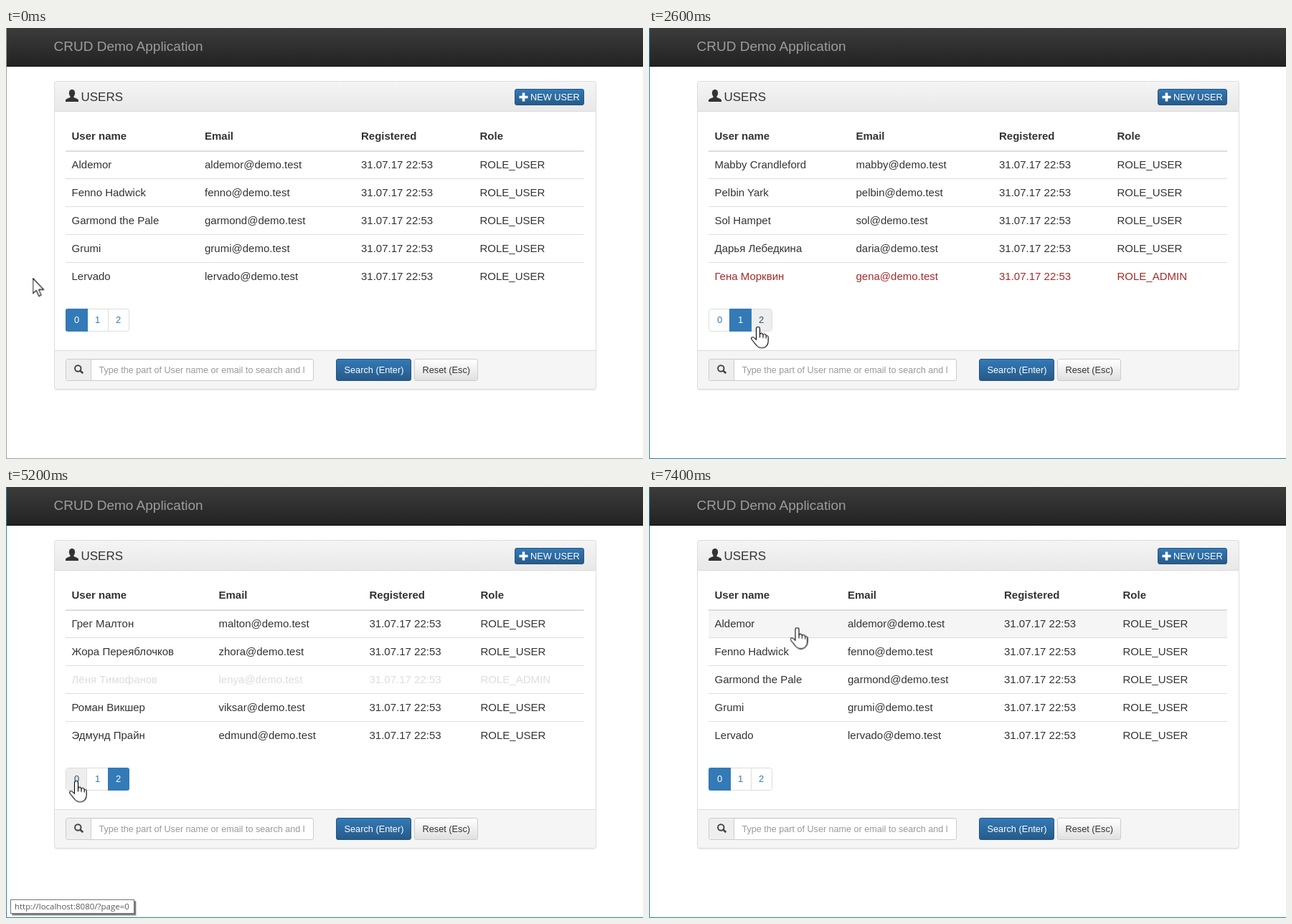
Write an HTML page that moves like this. It is 888 px wide and 602 px high and loops after 8 s.

```html
<!DOCTYPE html>
<html lang="en">
<head>
<meta charset="utf-8">
<title>CRUD Demo Application</title>
<style>
html, body { margin: 0; width: 100%; height: 100%; overflow: hidden; background: #fff; }
svg { display: block; width: 888px; height: 602px; }
text { font-family: "Liberation Sans", Arial, sans-serif; font-size: 15px; fill: #333; white-space: pre; }
.head { font-weight: bold; }
.small { font-size: 12.75px; }
.mid { text-anchor: middle; font-size: 13px; fill: #337ab7; }
.white { fill: #fff; }
.admin { fill: #a52a2a; }
.off { fill: #ddd; }
.rule { stroke: #ddd; }
.tip text { font: 11.5px "Open Sans", "Noto Sans", sans-serif; fill: #575757; }

/* every change is a hard cut; 2.5% = 200 ms */
.anim { animation: 8s step-end infinite; }
#frame { animation-name: frame; }
#page0 { animation-name: page0; }
#page1 { animation-name: page1; }
#page2 { animation-name: page2; }
#hover0 { animation-name: hover0; }
#hover1 { animation-name: hover1; }
#hover2 { animation-name: hover2; }
#tip0 { animation-name: tip0; }
#tip1 { animation-name: tip1; }
#tip2 { animation-name: tip2; }
#rowHover { animation-name: rowHover; }
#cursor { animation-name: move; }
#arrow { animation-name: arrow; }
#hand { animation-name: hand; }

@keyframes frame { 0% { stroke: #a0a0a0 } 17.5%, 100% { stroke: #2b82a3 } }
@keyframes page0 { 0% { opacity: 1 } 20% { opacity: 0 } 72.5%, 100% { opacity: 1 } }
@keyframes page1 { 0% { opacity: 0 } 20% { opacity: 1 } 47.5%, 100% { opacity: 0 } }
@keyframes page2 { 0% { opacity: 0 } 47.5% { opacity: 1 } 72.5%, 100% { opacity: 0 } }
@keyframes hover0 { 0% { opacity: 0 } 62.5% { opacity: 1 } 72.5%, 100% { opacity: 0 } }
@keyframes hover1 { 0% { opacity: 0 } 7.5% { opacity: 1 } 20% { opacity: 0 } 57.5% { opacity: 1 } 62.5%, 100% { opacity: 0 } }
@keyframes hover2 { 0% { opacity: 0 } 32.5% { opacity: 1 } 47.5%, 100% { opacity: 0 } }
@keyframes tip0 { 0% { opacity: 0 } 65% { opacity: 1 } 72.5% { opacity: .4 } 75%, 100% { opacity: 0 } }
@keyframes tip1 { 0% { opacity: 0 } 10% { opacity: 1 } 20% { opacity: .5 } 22.5% { opacity: .06 } 27.5%, 100% { opacity: 0 } }
@keyframes tip2 { 0% { opacity: 0 } 35% { opacity: 1 } 57.5% { opacity: .5 } 60%, 100% { opacity: 0 } }
@keyframes rowHover {
  0% { opacity: 0; transform: none }
  87.5% { opacity: 1; transform: translateY(156px) }
  90% { opacity: 1; transform: translateY(78px) }
  92.5%, 100% { opacity: 1; transform: none }
}
@keyframes arrow {
  0% { opacity: 1 } 7.5% { opacity: 0 } 20% { opacity: 1 } 32.5% { opacity: 0 } 47.5% { opacity: 1 }
  57.5% { opacity: 0 } 72.5% { opacity: 1 } 87.5%, 100% { opacity: 0 }
}
@keyframes hand {
  0% { opacity: 0 } 7.5% { opacity: 1 } 20% { opacity: 0 } 32.5% { opacity: 1 } 47.5% { opacity: 0 }
  57.5% { opacity: 1 } 72.5% { opacity: 0 } 87.5%, 100% { opacity: 1 }
}
@keyframes move {
  0% { transform: translate(37.5px, 349.5px) }
  2.5% { transform: translate(58px, 367px) }
  5% { transform: translate(98px, 398px) }
  7.5% { transform: translate(125px, 414px) }
  10% { transform: translate(133.5px, 417.5px) }
  20% { transform: translate(131.5px, 417.5px) }
  27.5% { transform: translate(134px, 417.5px) }
  30% { transform: translate(140px, 417.5px) }
  32.5% { transform: translate(152px, 417.5px) }
  35% { transform: translate(158.5px, 417.5px) }
  47.5% { transform: translate(155px, 417.5px) }
  55% { transform: translate(152.5px, 417.5px) }
  57.5% { transform: translate(138px, 416px) }
  60% { transform: translate(118px, 413px) }
  62.5% { transform: translate(100px, 410.5px) }
  65% { transform: translate(98px, 410.5px) }
  72.5% { transform: translate(95.5px, 410.5px) }
  75% { transform: translate(97px, 412px) }
  77.5% { transform: translate(122px, 428px) }
  80% { transform: translate(165px, 434px) }
  82.5% { transform: translate(215px, 430px) }
  85% { transform: translate(253px, 414px) }
  87.5% { transform: translate(244px, 358px) }
  90% { transform: translate(224px, 262px) }
  92.5%, 100% { transform: translate(206.5px, 196.5px) }
}
</style>
</head>
<body>
<svg viewBox="0 0 888 602">
  <defs>
    <linearGradient id="nav" x2="0" y2="1"><stop stop-color="#3c3c3c"/><stop offset="1" stop-color="#222"/></linearGradient>
    <linearGradient id="title" x2="0" y2="1"><stop stop-color="#f5f5f5"/><stop offset="1" stop-color="#e8e8e8"/></linearGradient>
    <linearGradient id="blue" x2="0" y2="1"><stop stop-color="#337ab7"/><stop offset="1" stop-color="#265a88"/></linearGradient>
    <linearGradient id="grey" x2="0" y2="1"><stop stop-color="#fff"/><stop offset="1" stop-color="#e0e0e0"/></linearGradient>
    <clipPath id="panel"><rect x="67" y="74" width="756" height="431" rx="4"/></clipPath>
    <clipPath id="pager"><rect x="83" y="392" width="89" height="32" rx="3"/></clipPath>
  </defs>

  <rect width="888" height="53" fill="url(#nav)"/>
  <rect y="53" width="888" height="1" fill="#080808"/>
  <text x="66.5" y="32" style="font-size:19px;fill:#9d9d9d">CRUD Demo Application</text>
  <path id="frame" class="anim" d="M.5 0V601.5H888" fill="none"/>

  <rect x="67" y="75" width="756" height="431.5" rx="4" fill="#000" opacity=".07"/>
  <g clip-path="url(#panel)">
    <rect x="67" y="74" width="756" height="431" fill="#fff"/>
    <rect x="67" y="74" width="756" height="42" fill="url(#title)"/>
    <rect x="67" y="450" width="756" height="55" fill="#f5f5f5"/>
    <path class="rule" d="M67 116.5H823M67 450.5H823"/>
  </g>
  <rect class="rule" x="67.5" y="74.5" width="755" height="430" rx="3.5" fill="none"/>

  <g fill="#333">
    <ellipse cx="92" cy="91" rx="4.2" ry="5.2"/>
    <path d="M89.5 94H94.5V97Q101 99 101 101V103H83V101Q83 99 89.5 97Z"/>
  </g>
  <text x="104.5" y="102" style="font-size:17px">USERS</text>

  <rect x="709.5" y="85.5" width="96" height="22" rx="2.5" fill="url(#blue)" stroke="#245580"/>
  <path d="M715.5 96.5H727.5M721.5 90.5V102.5" stroke="#fff" stroke-width="3.6"/>
  <text class="small white" x="731" y="101">NEW USER</text>

  <rect id="rowHover" class="anim" x="83" y="173" width="723" height="37" fill="#f5f5f5"/>
  <path d="M83 172H806" stroke="#ddd" stroke-width="2"/>
  <path class="rule" d="M83 210.5H806M83 249.5H806M83 288.5H806M83 327.5H806"/>
  <g id="pages"></g>

  <rect x="83.5" y="462.5" width="345" height="30" rx="2.5" fill="#fff" stroke="#ccc"/>
  <path d="M118.5 463V492H86Q84 492 84 490V465Q84 463 86 463Z" fill="#eee"/>
  <path d="M118.5 463V492" stroke="#ccc"/>
  <path d="M119 463.5H427" stroke="#000" opacity=".06"/>
  <g fill="none" stroke="#444" stroke-width="2">
    <circle cx="100.3" cy="475.5" r="4.2"/>
    <path d="M103.5 478.7L107.3 482.3" stroke-width="2.6"/>
  </g>
  <text x="129.5" y="482" style="font-size:12.6px;fill:#999">Type the part of User name or email to search and l</text>
  <rect x="460.5" y="462.5" width="104" height="30" rx="2.5" fill="url(#blue)" stroke="#245580"/>
  <text class="small white" x="471.5" y="482">Search (Enter)</text>
  <rect x="569.5" y="462.5" width="88" height="30" rx="2.5" fill="url(#grey)" stroke="#ccc"/>
  <text class="small" x="580.5" y="482">Reset (Esc)</text>

  <g id="hovers"></g>
  <g id="tips"></g>

  <g id="cursor" class="anim" fill="#fff" stroke="#000" stroke-width="1.1" stroke-linejoin="round">
    <path id="arrow" class="anim" d="M0 0V21.3L4.8 17L8.4 25L11.6 23.6L8.2 15.9H15Z"/>
    <g id="hand" class="anim">
      <path d="M-2.5 18V2.5a2.5 2.5 0 0 1 5 0V10.5a2.3 2.3 0 0 1 4.5 .8a2.2 2.2 0 0 1 4.2 .9a2.1 2.1 0 0 1 3 2V20q0 4-2 6q-2 3.3-7 3.3q-5 0-7.7-4L-8.9 17.5q-1.3-3 1.3-3.3q2-.1 5.1 3.8z"/>
      <path d="M2.5 10.5V15M7 11.3V15.5M11.2 12.2V16" fill="none"/>
    </g>
  </g>
</svg>
<script>
const DATE = "31.07.17 22:53";
const HEAD = ["User name", "Email", "Registered", "Role"];
// rows: name, mailbox, optional style for administrators
const PAGES = [
  { cols: [91.5, 277, 495, 660.5], rows: [
    ["Aldemor", "aldemor"], ["Fenno Hadwick", "fenno"], ["Garmond the Pale", "garmond"],
    ["Grumi", "grumi"], ["Lervado", "lervado"]] },
  { cols: [91.5, 288.5, 488, 652.5], rows: [
    ["Mabby Crandleford", "mabby"], ["Pelbin Yark", "pelbin"], ["Sol Hampet", "sol"],
    ["Дарья Лебедкина", "daria"], ["Гена Морквин", "gena", "admin"]] },
  { cols: [91.5, 296.5, 506.5, 661.5], rows: [
    ["Грег Малтон", "malton"], ["Жора Переяблочков", "zhora"], ["Лёня Тимофанов", "lenya", "off"],
    ["Роман Викшер", "viksar"], ["Эдмунд Прайн", "edmund"]] }
];
const DIGIT_X = [98.5, 127.5, 156.5];
const BOX = [[83, 31], [112, 31], [142, 30]];

const text = (x, y, s, cls = "") => `<text x="${x}" y="${y}" class="${cls}">${s}</text>`;
const line = (cols, y, cells, cls) => cells.map((s, i) => text(cols[i], y, s, cls)).join("");
const digit = (k, cls = "", style = "") =>
  `<text x="${DIGIT_X[k]}" y="412" class="mid ${cls}" style="${style}">${k}</text>`;

function pager(active) {
  const [x, w] = BOX[active];
  return `<rect class="rule" x="83.5" y="392.5" width="88" height="31" rx="3" fill="#fff"/>
    <path class="rule" d="M112.5 393V423M142.5 393V423"/>
    <rect x="${x}" y="392" width="${w}" height="32" fill="#337ab7" clip-path="url(#pager)"/>` +
    BOX.map((_, k) => digit(k, k === active ? "white" : "")).join("");
}

function page({ cols, rows }, k) {
  const body = rows.map(([name, box, cls], i) =>
    line(cols, 196 + 39 * i,
      [name, box + "@demo.test", DATE, cls ? "ROLE_ADMIN" : "ROLE_USER"], cls));
  return `<g id="page${k}" class="anim">${line(cols, 156, HEAD, "head")}${body.join("")}${pager(k)}</g>`;
}

const hover = (_, k) => `<g id="hover${k}" class="anim">
  <rect x="${[84, 114, 143][k]}" y="393" width="28" height="30" rx="1" fill="#eee"/>
  ${digit(k, "", "fill:#23527c")}</g>`;

const tip = (_, k) => `<g id="tip${k}" class="anim tip">
  <rect x="9" y="579" width="173" height="20" fill="#000" opacity=".18"/>
  <rect x="8" y="578" width="173" height="20" fill="#000" opacity=".4"/>
  <rect x="6.5" y="576.5" width="172" height="19" fill="#fff" stroke="#767676"/>
  ${text(12, 590, "http://localhost:8080/?page=" + k)}</g>`;

const fill = (id, make) => document.getElementById(id).innerHTML = PAGES.map(make).join("");
fill("pages", page);
fill("hovers", hover);
fill("tips", tip);
</script>
</body>
</html>
```
